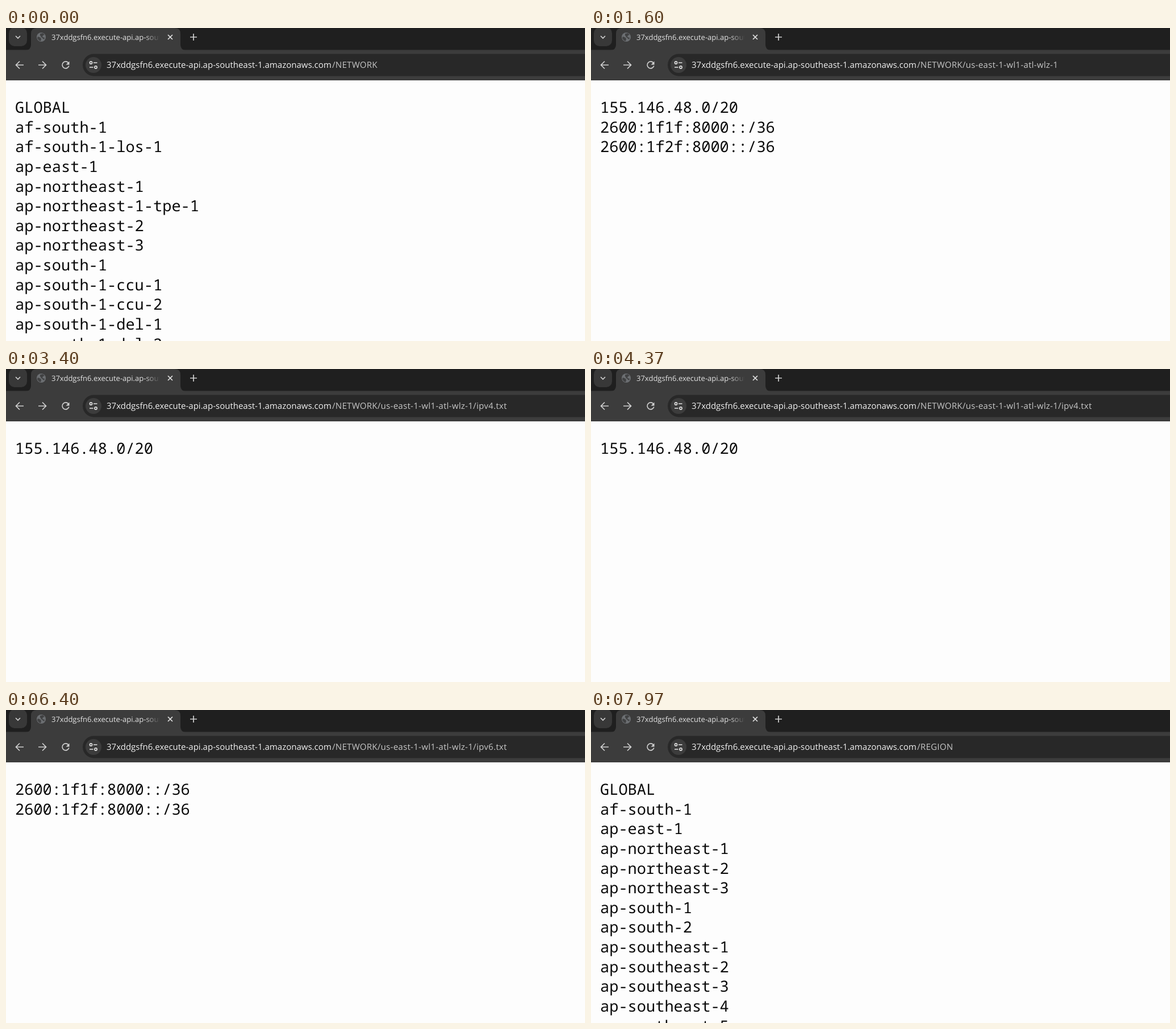
Recreate the animation shown at these times as an HTML page. Size 1019 by 550 pixels, loop 8 s.

```html
<!DOCTYPE html>
<html lang="en">
<head>
<meta charset="utf-8">
<title>Network ranges</title>
<style>
  html, body { margin: 0; width: 100%; height: 100%; overflow: hidden; background: #fdfdfd; }
  svg { display: block; width: 1019px; height: 550px; }
  text { text-rendering: geometricPrecision; white-space: pre; }
  .ui { font-family: "Open Sans", "Noto Sans", sans-serif; }
  .title { font-size: 13px; fill: #e3e3e3; }
  .url { font-size: 15px; fill: #f0f0f0; }
  .path { fill: #c7c7c7; letter-spacing: .3px; }
  .page { font: 27px "Noto Sans Mono", "DejaVu Sans Mono", monospace; fill: #0a0a0a; }
  .icon { fill: none; stroke: #d0d0d0; stroke-width: 1.7; }
</style>
</head>
<body>
<svg viewBox="0 0 1019 550">
  <defs>
    <linearGradient id="fade" gradientUnits="userSpaceOnUse" x1="244" x2="271" y1="0" y2="0">
      <stop offset="0" stop-color="#3c3c3c" stop-opacity="0"/>
      <stop offset="1" stop-color="#3c3c3c"/>
    </linearGradient>
    <clipPath id="titleBox"><rect x="78" y="4" width="192" height="26"/></clipPath>
  </defs>

  <rect width="1019" height="550" fill="#fdfdfd"/>
  <rect width="1019" height="39" fill="#1f1f1f"/>
  <rect y="38.5" width="1019" height="53.5" fill="#3c3c3c"/>

  <!-- tab strip -->
  <rect x="5" y="-1" width="32" height="33" rx="10" fill="#383838"/>
  <path class="icon" stroke-width="2" d="M17 14l4 4 4-4"/>
  <path fill="#3c3c3c" d="M34 39q10 0 10-10V10q0-10 10-10H297q10 0 10 10V29q0 10 10 10z"/>
  <g id="favicon">
    <circle cx="62" cy="16" r="8" fill="#6c6f72"/>
    <path fill="#404142" d="M56 15l5 2 1 3-1 3-3-1-3-4zM60 10l5-1 3 3-3 1-1 3 4 1-1 3-4-3-3-4z"/>
  </g>
  <g clip-path="url(#titleBox)">
    <text class="ui title" x="80" y="21">37xddgsfn6.execute-api.ap-southeast-1</text>
    <rect x="244" y="4" width="27" height="26" fill="url(#fade)"/>
  </g>
  <path class="icon" style="stroke:#e3e3e3" d="M285 12l8 8M293 12l-8 8"/>
  <path class="icon" d="M324 16h12M330 10v12"/>

  <!-- toolbar -->
  <path class="icon" d="M31 65H18M24 58.5L17.5 65l6.500 6.500"/>
  <path class="icon" d="M57 65h13M64 58.500L70.500 65l-6.500 6.500"/>
  <g id="reload">
    <path class="icon" d="M109.600 61A6 6 0 1 0 110.800 66.500"/>
    <path fill="#d0d0d0" d="M111.500 58.500v6h-6z"/>
  </g>
  <path id="stop" class="icon" d="M100 60l10 10M110 60l-10 10"/>
  <rect x="135" y="45.500" width="920" height="39" rx="19.500" fill="#282828"/>
  <circle cx="154" cy="65" r="14" fill="#3c3c3c"/>
  <g class="icon" style="stroke:#e3e3e3;stroke-width:1.6">
    <circle cx="149.500" cy="61" r="2.100"/>
    <circle cx="158" cy="69" r="2.100"/>
    <path d="M154 61h6.500M147 69h6.500"/>
  </g>
  <text class="ui url" x="177" y="70">37xddgsfn6.execute-api.ap-southeast-1.amazonaws.com</text>
  <text class="ui url path" id="path" x="574" y="70"></text>

  <g class="page" id="page"></g>
</svg>
<script>
const LOOP = 8000, LOAD = 160, LINE = 34.64;
const zone = "/NETWORK/us-east-1-wl1-atl-wlz-1";
const ipv4 = ["155.146.48.0/20"];
const ipv6 = ["2600:1f1f:8000::/36", "2600:1f2f:8000::/36"];
const words = s => s.split(" ");

const views = [
  { at: 0, path: "/NETWORK", lines: words("GLOBAL af-south-1 af-south-1-los-1 ap-east-1 ap-northeast-1 " +
    "ap-northeast-1-tpe-1 ap-northeast-2 ap-northeast-3 ap-south-1 ap-south-1-ccu-1 ap-south-1-ccu-2 " +
    "ap-south-1-del-1 ap-south-1-del-2") },
  { at: 1260, path: zone, lines: [...ipv4, ...ipv6] },
  { at: 3240, path: zone + "/ipv4.txt", lines: ipv4 },
  { at: 5250, path: zone + "/ipv6.txt", lines: ipv6 },
  { at: 7250, path: "/REGION", lines: words("GLOBAL af-south-1 ap-east-1 ap-northeast-1 ap-northeast-2 " +
    "ap-northeast-3 ap-south-1 ap-south-2 ap-southeast-1 ap-southeast-2 ap-southeast-3 ap-southeast-4 " +
    "ap-southeast-5") }
];

const el = id => document.getElementById(id);
const show = (id, on) => el(id).setAttribute("visibility", on ? "visible" : "hidden");
let current = null;

function open(view) {
  if (view === current) return;
  current = view;
  el("path").textContent = view.path;
  el("page").replaceChildren(...view.lines.map((line, i) => {
    const row = document.createElementNS("http://www.w3.org/2000/svg", "text");
    row.setAttribute("x", 16);
    row.setAttribute("y", 149 + i * LINE);
    row.textContent = line;
    return row;
  }));
}

function draw(t) {
  open(views.findLast(v => v.at <= t));
  const loading = views.some(v => t < v.at && t >= v.at - LOAD);
  show("favicon", !loading);
  show("reload", !loading);
  show("stop", loading);
}

const start = performance.now();
function tick() {
  draw((performance.now() - start) % LOOP);
  requestAnimationFrame(tick);
}
tick();
</script>
</body>
</html>
```
